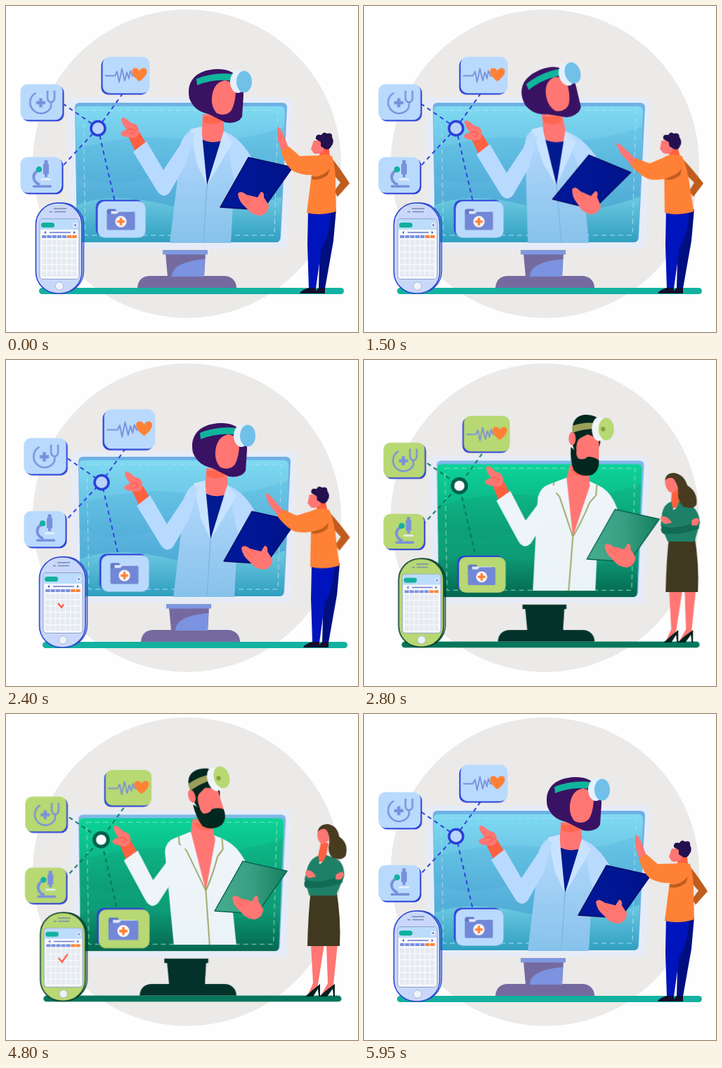
Write an HTML page that moves like this. It is 501 px wide and 465 px high and loops after 6 s.

```html
<!DOCTYPE html>
<html lang="en">
<head>
<meta charset="utf-8">
<title>Online doctor</title>
<style>
html, body { margin: 0; width: 100%; height: 100%; overflow: hidden; background: #fefefe; }
svg { display: block; width: 501px; height: 465px; }

.day { animation: slideDay 6s linear infinite; }
.green { animation: slideGreen 6s linear infinite; }
@keyframes slideDay {
  0%, 39.2% { transform: translateX(0); animation-timing-function: cubic-bezier(.32, 0, .67, 0); }
  43.1%, 94% { transform: translateX(510px); animation-timing-function: cubic-bezier(.33, 1, .68, 1); }
  97.5%, 100% { transform: translateX(0); }
}
@keyframes slideGreen {
  0%, 43.1% { transform: translateX(510px); animation-timing-function: cubic-bezier(.33, 1, .68, 1); }
  47%, 90.3% { transform: translateX(0); animation-timing-function: cubic-bezier(.32, 0, .67, 0); }
  94%, 100% { transform: translateX(510px); }
}

/* doctor: leans left towards the node and back, the head tilts a little later */
.sway { animation: sway 3s ease-in-out infinite; }
@keyframes sway {
  0%, 1.3%, 79%, 100% { transform: none; }
  24%, 60.5% { transform: var(--left); }
}
.nod { animation: nod 3s ease-in-out infinite; }
@keyframes nod {
  0%, 6%, 79%, 100% { transform: rotate(0deg); }
  37%, 60.5% { transform: rotate(-17deg); }
}
.coat { --left: skewX(8.4deg); transform-origin: 280px 337px; }
.board { transform-origin: 356px 250px; }
.day .arm { --left: translate(-21px, 4px); }
.day .board { --left: translate(-31px, -2px) rotate(10deg); }
.day .head { --left: translate(-28px, -3px); }
.day .nod { transform-origin: 300px 150px; }
.green .arm { --left: translate(-20px, 9px); }
.green .board { --left: translate(-20px, -3px); }
.green .head { --left: translate(-24px, 0); }
.green .nod { transform-origin: 310px 140px; }

.man { animation: man 6s ease-in-out infinite; }
@keyframes man {
  0%, 11.3%, 50%, 100% { transform: none; }
  22%, 35% { transform: var(--left); }
}
.manBody { --left: skewX(8deg); transform-origin: 448px 295px; }
.manArm { --left: rotate(-20deg); transform-origin: 447px 223px; }

.woman { animation: woman 6s ease-in-out infinite; }
@keyframes woman {
  0%, 65%, 88.5%, 100% { transform: none; }
  74%, 81% { transform: var(--right); }
}
.womanBody { --right: skewX(-8deg); transform-origin: 452px 256px; }
.womanHead { --right: translate(3px, -4px); }

.pulse { transform-origin: 0 0; animation: pulse 1.5s ease-in-out infinite; }
@keyframes pulse {
  0%, 28%, 72%, 100% { transform: scale(1); }
  50% { transform: scale(1.09); }
}
.lines { animation: march .5s linear infinite; }
@keyframes march { to { stroke-dashoffset: -11; } }

.tick { stroke-dasharray: 1 2; }
.day .tick { animation: tickDay 6s linear infinite; }
.green .tick { animation: tickGreen 6s linear infinite; }
@keyframes tickDay {
  0%, 37.5% { stroke-dashoffset: 1; }
  41.7%, 60% { stroke-dashoffset: 0; }
  60.1%, 100% { stroke-dashoffset: 1; }
}
@keyframes tickGreen {
  0%, 74.5% { stroke-dashoffset: 1; }
  78%, 87% { stroke-dashoffset: 0; }
  91.4%, 100% { stroke-dashoffset: -1; }
}
</style>
</head>
<body>
<svg id="stage" viewBox="0 0 501 465"></svg>
<script>
const skin = '#ff7673', deepSkin = '#ff6040', orange = '#ff8136', icon = '#7a90dc';

const themes = {
  day: {
    ground: '#12b1a0', foot: '#756a9f', bar: '#8098df', sheen: '#7b93e0', strip: '#6fb0e6',
    screen: ['#7fdaf1', '#5eb6df', '#3fa3cb'], wave: ['#6fc9e2', '#2f9fc0'], dash: '#a9dcf2',
    line: '#2f45dc', node: '#b9d3fb', ring: '#2a3fd6', ringWidth: 3.5,
    card: '#b9dafd', edge: '#2b3fd9', phone: '#c9d8fa', rim: '#2b47cf',
    sleeve: '#b8daff', coat: ['#b8daff', '#86c2ea'], clip: ['#00189a', '#00138a'], clipEdge: '#0a0c66',
    fit: '', armAt: '', clipAt: ''
  },
  green: {
    ground: '#05765b', foot: '#02322a', bar: '#02322a', sheen: '#02322a', strip: '#7db8e8',
    screen: ['#0dd498', '#0ca57c', '#128c6c'], wave: ['#0f9f7a', '#04674f'], dash: '#8fe0c4',
    line: '#06735a', node: '#ffffff', ring: '#035f4c', ringWidth: 5,
    card: '#b7d873', edge: '#2b3fd9', phone: '#b7d873', rim: '#053a2c',
    sleeve: '#eef5f9', coat: ['#f0f6fa', '#eaf3f7'], clip: ['#45ad8e', '#3a9f82', '#15805f'], clipEdge: '#056650',
    fit: 'translate(7.4 8.9) scale(.977)', armAt: 'translate(4 -5) rotate(3 224 268)', clipAt: 'translate(12 -3)'
  }
};

const path = (d, fill, extra = '') => `<path d="${d}" fill="${fill}" ${extra}/>`;
const line = (d, color, width, extra = '') =>
  `<path d="${d}" fill="none" stroke="${color}" stroke-width="${width}" ${extra}/>`;
const rect = (x, y, w, h, r, fill, extra = '') =>
  `<rect x="${x}" y="${y}" width="${w}" height="${h}" rx="${r}" fill="${fill}" ${extra}/>`;
const oval = (x, y, rx, ry, fill, extra = '') =>
  `<ellipse cx="${x}" cy="${y}" rx="${rx}" ry="${ry}" fill="${fill}" ${extra}/>`;
const group = (cls, body, at = '') => `<g class="${cls}" transform="${at}">${body}</g>`;
const gradient = (id, colors, dir = 'x2="0" y2="1"') => `<linearGradient id="${id}" ${dir}>` +
  colors.map((c, i) => `<stop offset="${i / (colors.length - 1)}" stop-color="${c}"/>`).join('') +
  '</linearGradient>';
const cross = (x, y, s, w, color) => line(`M${x - s} ${y}h${2 * s}M${x} ${y - s}v${2 * s}`, color, w);

const icons = {
  stethoscope: () =>
    line('M-8 -13A15.5 15.5 0 1 0 13.5 7V1', icon, 2.4) +
    line('M10 -15H8.5V-6A5 6.5 0 0 0 18.5 -6V-15H17', icon, 2.4) +
    cross(-1, 1, 6.5, 4.5, icon),
  pulseLine: () =>
    line('M-30 1H-16L-13 -5L-10 10L-6 -9L-2 8L1 -4L4 5L6 -6L9 1H12', icon, 1.8, 'stroke-linejoin="round"') +
    path('M19 9C5 -1 7 -10 13 -10Q17 -10 19 -6Q21 -10 25 -10C31 -10 33 -1 19 9Z', orange),
  microscope: () =>
    rect(-12, 14.5, 27, 3.5, 1.5, icon) + rect(3, -16, 8, 15, 1, icon) + rect(4.5, -21, 5, 6, 1, icon) +
    rect(5, -1, 4, 4, 0, icon) + rect(0, 5, 14, 2.5, 0, '#e8f0fb') +
    line('M1 -8C-14 -5 -14 9 -2 14', icon, 4) + oval(-3, -8, 4.2, 4.2, '#12b1a0'),
  folder: () =>
    path('M-21 -12Q-21 -15 -18 -15H-9L-6 -11H16V0H-21Z', '#6478c8') +
    path('M-15 -12L14 -12V-5H-15Z', '#dfe9fb') +
    path('M-21 -8H-7L-4 -11H17Q19 -11 19 -9V13Q19 15 17 15H-19Q-21 15 -21 13Z', '#7288d6') +
    oval(-1, 3, 8, 8, '#fff') + cross(-1, 3, 5.5, 3.6, orange)
};

function card(t, x, y, w, h, sx, sy, delay, name) {
  const face = (dx, dy, fill) => rect(dx - w / 2, dy - h / 2, w, h, 10, fill);
  return `<g transform="translate(${x} ${y})"><g class="pulse" style="animation-delay:${delay}ms">` +
    face(sx, sy, t.edge) + face(0, 0, t.card) + icons[name]() + '</g></g>';
}

function monitor(t, id) {
  const screen = 'M105 138H393Q400 138 400 145L391 331Q390 337 384 337H108Q102 337 101 331L98 145Q98 138 105 138Z';
  return rect(47, 402, 434, 9, 4.5, t.ground) +
    path('M187 402C188 390 195 385 205 385H310C322 385 328 393 328 402Z', t.foot) +
    path('M227 353H284L282 386H230Z', t.foot) + path('M236 386Q236 365 283 361L282 386Z', t.sheen) +
    rect(223, 348, 64, 6.5, 0, t.bar) +
    path('M95 131H400Q408 131 408 139L401 340Q400 346 394 346H97Q91 346 91 340L87 139Q87 131 95 131Z', '#e6ecf7') +
    path(screen, t.strip) +
    path('M105 143H390Q397 143 397 150L390 331Q389 337 383 337H108Q102 337 101 331L99 150Q99 143 105 143Z', `url(#${id}Screen)`) +
    path('M99 205Q180 180 250 190T396 172L393 240Q300 215 220 240T100 240Z', t.screen[2], 'opacity=".2"') +
    path('M100 284Q150 264 230 284T392 272L390 331Q389 337 383 337H108Q102 337 101 331Z', `url(#${id}Wave)`) +
    line('M110 149H387L382 327H113Z', t.dash, 1, 'stroke-dasharray="7 5"');
}

function phone(t) {
  let cells = '';
  for (let i = 0; i < 7; i++) {
    const x = 51.2 + i * 7.2;
    cells += rect(x, 327, 6.2, 4, 0, i > 4 ? orange : icon);
    for (let j = 0; j < 6; j++) cells += rect(x, 333.5 + j * 9, 6, 7.5, .5, '#e6ebf2');
  }
  return rect(46, 281, 64.5, 128, 31, 'none', `stroke="${t.rim}" stroke-width="1.4"`) +
    rect(42.5, 281, 65.5, 129, 31, t.phone, `stroke="${t.rim}" stroke-width="1.6"`) +
    line('M68 289H86M62 293.5H66M69 293.5H85', '#7388b8', 1.6) +
    rect(47.5, 303, 57, 87, 5, '#8f9fc8') + rect(48.5, 304, 55, 85, 4, '#f7f9fc') +
    path('M48.5 319V308Q48.5 304 52 304H100Q103.5 304 103.5 308V319Z', '#bcdcfb') +
    rect(50, 309, 19, 7, 3.5, '#10b09c') + oval(98.5, 312.5, 3.2, 3.2, '#eef4fd') +
    cross(98.5, 312.5, 2, .9, '#4b62c8') +
    line('M62 323H92', '#4b62c8', 1.3) + path('M57 321V325L54 323ZM96 321V325L99 323Z', '#4b62c8') +
    cells + oval(76, 399.5, 5.8, 5.8, '#eef2fa', 'stroke="#a9b8d8"') +
    line('M69 347L74 353L82 341.5', '#ff5638', 2.2, 'class="tick" pathLength="1"');
}

function common(t, id) {
  return `<g transform="${t.fit}">` + monitor(t, id) +
    line('M131 174L82 140M131 174L80 229M131 174L166 125M131 174L155 279', t.line, 2, 'class="lines" stroke-dasharray="6 5"') +
    card(t, 50.5, 137, 60, 51, 2, 2, -125, 'stethoscope') +
    card(t, 171, 98.5, 67, 52, -2, 2, -1410, 'pulseLine') +
    card(t, 50, 241, 59, 51, 2, 2, -210, 'microscope') +
    card(t, 164.5, 304.5, 68, 52, -2.5, -2, -450, 'folder') +
    oval(131, 174.5, 10, 10, t.node, `stroke="${t.ring}" stroke-width="${t.ringWidth}"`) +
    phone(t) + '</g>';
}

const coats = {
  day: () =>
    path('M278 172L262 178Q252 183 250 198L233 338H320L324 262L352 221C340 200 328 184 308 178Z', 'url(#dayCoat)') +
    path('M312 180C328 186 341 200 352 221L328 252L322 238Z', '#b8daff') +
    path('M280 155L278 192Q295 201 311 193L309 150Z', skin) +
    path('M281 165Q290 172 306 166L306 158H281Z', deepSkin, 'opacity=".7"') +
    path('M278 190Q295 198 311 191L286 256Z', '#001a90') +
    path('M262 176L278 172L286 256L272 226Z', '#c8e3ff') + path('M310 178L323 194L286 256Z', '#c8e3ff') +
    line('M286 256L281 337', '#7db3e0', 1.2),
  green: () =>
    path('M290 167L264 177Q251 181 247 196L240 329H329L332 262L361 214C352 190 344 182 318 172Z', 'url(#greenCoat)') +
    path('M293 150L288 168L297 252L321 180L319 150Z', skin) +
    path('M294 158Q304 170 318 164V156H294Z', deepSkin, 'opacity=".6"') +
    line('M270 174L269 185L278 195Q288 225 297 252L291 329M331 178L330 193L321 203Q310 230 297 252', '#9aa05a', 1.8)
};

const heads = {
  day: () =>
    path('M261 132C256 108 270 91 300 90C326 89 339 106 338 128L336 158Q330 169 312 166L288 154Q268 150 261 132Z', '#3a1263') +
    path('M294 124Q298 108 312 106L327 111Q328 137 320 150Q312 158 300 153Q290 142 294 124Z', skin) +
    path('M271 104Q295 94 323 97L322 107Q298 103 272 113Z', '#10b59c') +
    oval(330, 108, 11, 16, '#e4f0fc') + oval(339, 108, 11, 15.5, '#70c0e9'),
  green: () =>
    path('M297 122V92Q301 78 316 78Q331 78 336 88V118L330 138H301Z', '#02271f') +
    path('M302 124Q303 112 310 110L318 106L334 112V146L318 154L302 146Z', skin) + oval(296, 112, 5, 9.5, skin) +
    path('M294 124Q300 128 304 140Q312 144 318 138Q328 138 334 143Q335 158 324 164Q308 168 298 157Q293 144 294 124Z', '#02271f') +
    path('M296 94Q312 88 330 90V98Q312 98 296 104Z', '#9aa05a') +
    oval(334, 98.5, 10, 17, '#f0f5f8') + oval(344.5, 98.5, 11, 16, '#b7d873') + oval(340, 98.5, 3, 3.2, '#8a9c40')
};

function doctor(t, id) {
  const arm = path('M185 209L199 195L190 180L174 186Z', deepSkin) +
    path('M164 160Q168 157 177 166L185 169Q191 175 188 184Q184 190 175 187Q165 187 163 182Q164 178 172 176Q164 168 164 160Z', skin) +
    line('M172 177Q179 173 183 178Q182 182 177 182', deepSkin, 1.3) +
    path('M268 182C257 180 251 188 248 198L224 234L200 193L181 208L214 262Q223 277 233 266L256 226Z', t.sleeve);
  const board = path('M345 216L408 230L365 291L305 287Z', `url(#${id}Clip)`, `stroke="${t.clipEdge}" stroke-width="1.5" stroke-linejoin="round"`) +
    path('M330 268Q333 262 342 269L358 273L363 265Q368 265 367 273L374 284Q374 296 362 299Q350 299 342 288Q331 279 330 268Z', skin) +
    line('M336 273L347 282M342 270L351 278', deepSkin, 1);
  return group('sway coat', coats[id]()) + group('', group('sway board', board), t.clipAt) +
    group('', group('sway arm', arm), t.armAt) + group('sway head', group('nod', heads[id]()));
}

const people = {
  day: () =>
    path('M450 292L470 290L466 335L454 403H445L447 330Z', '#000f80') +
    path('M430 292H463Q460 330 449 345L441 403H431L429 340Z', '#0014bd') +
    path('M418 410Q420 405 431 402H441V410ZM440 410Q441 404 446 402H454V410Z', '#140c2c') +
    group('man manBody',
      path('M462 215Q476 232 489 253L472 272L467 264L476 252L464 238Z', '#c05c1d') +
      path('M447 200L446 214Q454 220 461 213L459 196Z', deepSkin) +
      path('M438 216Q452 209 464 214Q470 232 469 262L470 293Q448 300 428 295L435 240Z', orange) +
      path('M435 243Q450 245 461 232L458 241Q446 250 435 247Z', '#c05c1d') +
      path('M438 192H452V206Q446 213 438 210L434 204Z', skin) +
      path('M441 190Q440 182 449 184Q452 178 457 182Q465 180 464 187Q468 194 463 200Q460 206 454 204L448 200V194Z', '#23104f') +
      group('man manArm',
        path('M386 172Q391 173 395 184L403 204L393 210L386 188Z', skin) +
        path('M402 200L391 207Q398 228 408 235Q430 246 450 237Q460 224 450 213L418 214Z', orange))),
  green: () =>
    path('M434 328H453L444 386L437 401L429 402L437 384Z', skin) +
    path('M456 328H472L466 386L456 401L448 402L458 384Z', skin) +
    path('M426 403L436 394L447 385V403H445L444 392L437 403ZM446 403L456 394L468 385V403H466L465 392L457 403Z', '#06201e') +
    path('M434 250H470Q477 290 475 331H429Q430 285 434 250Z', '#40391f') +
    group('woman womanBody',
      path('M438 183L436 212L448 210L449 184Z', deepSkin) +
      path('M437 202Q427 205 424 218L422 236L432 259H470L478 232Q476 212 462 206L448 201Q446 212 440 214Z', '#1f8068') +
      path('M424 236Q440 244 474 230L477 240Q456 250 426 248Q420 244 424 236Z', '#126b55') +
      path('M422 224Q430 220 438 232L428 234Q421 230 422 224ZM466 229Q476 221 477 230L474 236L466 236Z', skin) +
      group('woman womanHead',
        path('M428 172Q434 164 443 168L446 184Q440 191 434 188Q428 182 428 172Z', skin) +
        path('M428 172Q429 161 441 161Q455 163 460 179Q475 188 473 206Q469 214 454 209Q445 200 447 188Q446 176 440 169Q434 166 428 172Z', '#483b20')))
};

const defs = Object.entries(themes).map(([id, t]) =>
  gradient(id + 'Screen', t.screen) + gradient(id + 'Wave', t.wave) +
  gradient(id + 'Coat', t.coat) + gradient(id + 'Clip', t.clip, '')).join('');

document.getElementById('stage').innerHTML = `<defs>${defs}</defs>` +
  oval(257.5, 225, 219.5, 220, '#ebeae9') +
  Object.entries(themes).map(([id, t]) =>
    `<g class="${id}">${common(t, id)}${doctor(t, id)}${people[id]()}</g>`).join('');
</script>
</body>
</html>
```
